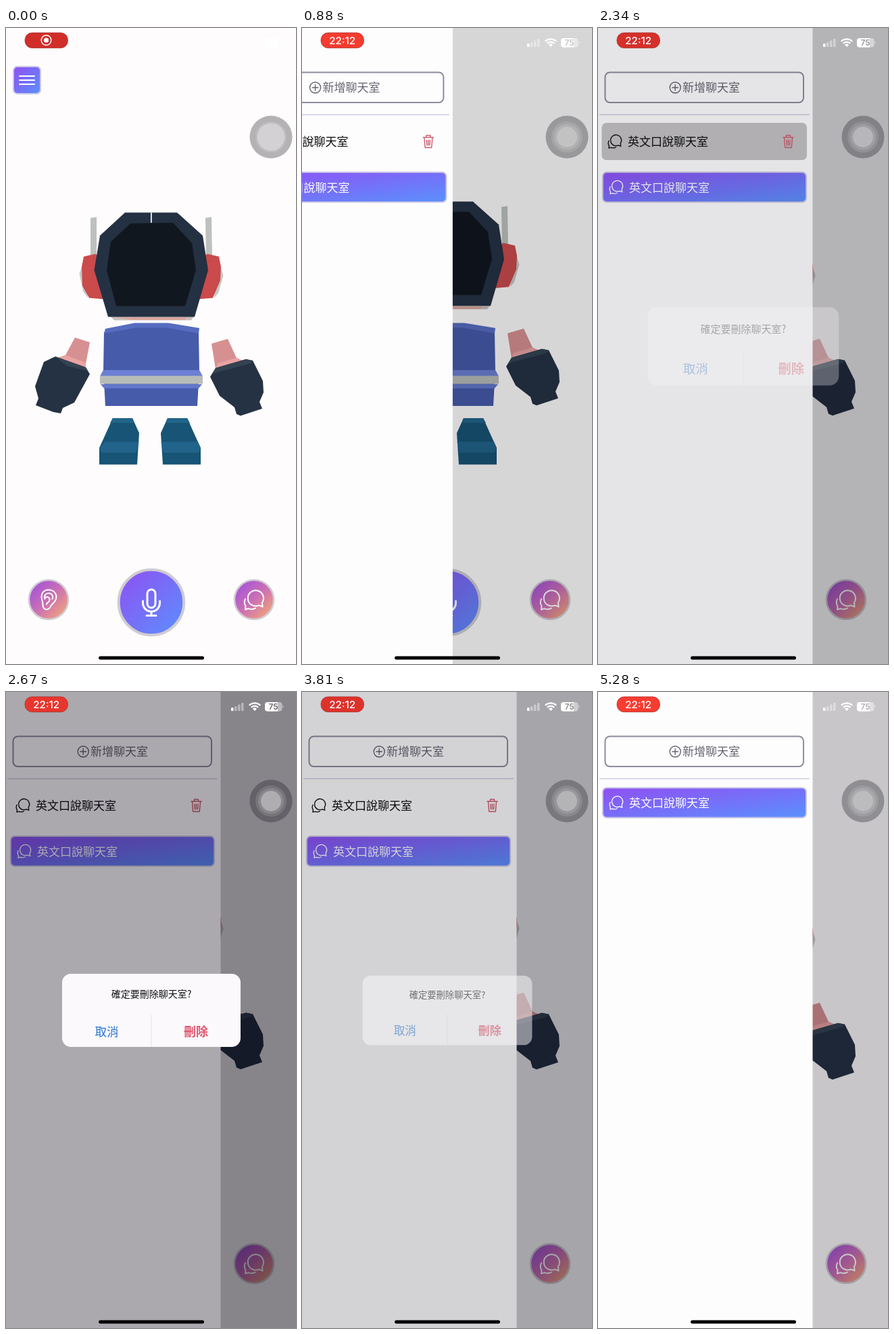
These frames come from a looping animation (429x939 px, 5340 ms). An HTML page:

```html
<!DOCTYPE html>
<html lang="zh-TW">
<head>
<meta charset="utf-8">
<title>Chat rooms</title>
<style>
html, body { margin: 0; width: 100%; height: 100%; overflow: hidden; background: #fefcfd; }
svg { display: block; width: 429px; height: 939px; }
text { font-family: "Noto Sans CJK TC", "Noto Sans CJK", sans-serif; font-size: 17px; }
.latin { font-family: Inter, Roboto, sans-serif; }
.mid { text-anchor: middle; }
.line { fill: none; stroke-linecap: round; stroke-linejoin: round; }
</style>
</head>
<body>
<svg viewBox="0 0 429 939" width="429" height="939">
  <defs>
    <linearGradient id="cool" x2="1" y2="1">
      <stop offset="0" stop-color="#9050f4"/>
      <stop offset=".5" stop-color="#766ff8"/>
      <stop offset="1" stop-color="#5a91fc"/>
    </linearGradient>
    <linearGradient id="warm" x2="1" y2="1">
      <stop offset=".1" stop-color="#a552da"/>
      <stop offset=".5" stop-color="#cb70b4"/>
      <stop offset=".92" stop-color="#f4a676"/>
    </linearGradient>
    <g id="bubbles" class="line">
      <path d="M10.300 12.500L5 10.400A11.600 11.600 0 1 1 9.600 6.500Z"/>
      <path d="M-15.200 1.100A10 10 0 0 0 -14.800 11.500L-15.300 16.700L-10.800 15.100A12 12 0 0 0 -.4 14.700"/>
    </g>
  </defs>
  <rect width="429" height="939" fill="#fefcfd"/>

  <g id="menu">
    <rect x="11" y="57" width="40" height="40" rx="6" fill="url(#cool)" stroke="#cbc6e6" stroke-width="2"/>
    <path class="line" d="M20 71H42M20 77H42M20 83H42" stroke="#fff" stroke-width="2"/>
  </g>

  <g id="body"></g>
  <g id="hands"></g>
  <g id="head"></g>

  <g stroke="#cfccd2">
    <circle cx="63" cy="844" r="29" fill="url(#warm)" stroke-width="2.6"/>
    <circle cx="215" cy="848" r="48.3" fill="url(#cool)" stroke-width="4"/>
    <circle cx="367" cy="844" r="29" fill="url(#warm)" stroke-width="2.6"/>
  </g>
  <g class="line" stroke="#fff" stroke-width="2">
    <path d="M54 847C50 836 55 829.500 63 829.500C71 829.500 76 836 74 843C72 849 68 850 66 854C64 859 58 860 55.500 856C54 853 54.500 850 54 847Z"/>
    <path d="M57.500 843C55.500 838 59 834.500 63 834.500C68 834.500 70.500 839 68.500 843M58 841C62 838.500 66 842 64 846C63 848.500 60 848 60 851"/>
    <g stroke-width="3">
      <rect x="209" y="829" width="12" height="27" rx="6"/>
      <path d="M202.500 846V849A12.500 12.500 0 0 0 227.500 849V846M215 862V867M208 867.500H222"/>
    </g>
    <use href="#bubbles" x="369.300" y="842"/>
  </g>

  <rect id="shade" width="429" height="939" fill="#05020c"/>

  <g id="panel">
    <rect width="317.500" height="939" fill="#fefdfe"/>
    <rect x="10.500" y="65.500" width="293.500" height="44.500" rx="7" fill="none" stroke="#8d8b9d" stroke-width="2"/>
    <path class="line" d="M110 88H118.500M114.200 83.700V92.200" stroke="#66636f" stroke-width="1.400"/>
    <circle cx="114.200" cy="88" r="8" fill="none" stroke="#66636f" stroke-width="1.400"/>
    <text x="125" y="94" fill="#66636f">新增聊天室</text>
    <path d="M2 128H313" stroke="#d2cde0" stroke-width="1.500"/>
    <g id="room">
      <rect id="press" x="5.500" y="140" width="303.500" height="55" rx="7" fill="#c4c2c4"/>
      <use href="#bubbles" transform="translate(26.600 165.900)scale(.69)" stroke="#111" stroke-width="2"/>
      <text x="44" y="174" fill="#0b0b0d">英文口說聊天室</text>
      <path class="line" d="M274 161.500H289M278.500 161V158.500H284.500V161M275.500 162L276.700 176.500H286.300L287.500 162M279 165.500L279.400 173M281.500 165.500V173M284 165.500L283.600 173" stroke="#cc5c6c" stroke-width="1.400"/>
    </g>
    <g id="active">
      <rect x="7" y="213" width="301" height="44" rx="6" fill="url(#cool)" stroke="#c8c4e6" stroke-width="2"/>
      <use href="#bubbles" transform="translate(28.600 233.400)scale(.69)" stroke="#fff" stroke-width="1.900"/>
      <text x="46" y="241.500" fill="#fff">英文口說聊天室</text>
    </g>
  </g>

  <rect id="dim" width="429" height="939" fill="#05020c"/>
  <g id="alert">
    <rect x="83" y="416" width="264" height="108" rx="13" fill="#fbf9fc"/>
    <path d="M215 477V524" stroke="#e3e1e6"/>
    <text class="mid" x="215" y="451" style="font-size:14px" fill="#111">確定要刪除聊天室?</text>
    <text class="mid" x="149" y="507.500" style="font-size:17.500px" fill="#2874d2">取消</text>
    <text class="mid" x="281" y="507.500" style="font-size:18px;font-weight:700" fill="#e0586e">刪除</text>
  </g>

  <g fill="#fff">
    <rect x="333" y="23" width="3.500" height="5" rx="1"/>
    <g opacity=".4">
      <rect x="338" y="21" width="3.500" height="7" rx="1"/>
      <rect x="343" y="18.500" width="3.500" height="9.500" rx="1"/>
      <rect x="348" y="16" width="3.500" height="12" rx="1"/>
    </g>
    <path d="M368 28L365 24.800A4.300 4.300 0 0 1 371 24.800Z"/>
    <g class="line" stroke="#fff" stroke-width="2.200" style="stroke-linecap:butt">
      <path d="M362.800 22.700A7.400 7.400 0 0 1 373.200 22.700M359.800 19.800A11.600 11.600 0 0 1 376.200 19.800"/>
    </g>
    <rect x="383" y="15" width="25.500" height="13.500" rx="4" opacity=".45"/>
    <path d="M387 15H402V28.500H387A4 4 0 0 1 383 24.500V19A4 4 0 0 1 387 15Z"/>
    <path d="M409.500 19.500Q412 21.700 409.500 24Z" opacity=".5"/>
  </g>
  <text id="charge" class="latin mid" x="395.500" y="26" style="font-size:12px;font-weight:600">75</text>

  <rect id="pill" x="28" y="7" width="63.500" height="22.500" rx="10.500" stroke="#a52a26" stroke-width=".7"/>
  <g id="rec">
    <circle cx="59.500" cy="18" r="7.300" fill="none" stroke="#fff" stroke-width="1.500"/>
    <circle cx="59.500" cy="18" r="3.600" fill="#fff"/>
  </g>
  <text id="clock" class="latin mid" x="59.700" y="23.700" style="font-size:15.200px;font-weight:500" fill="#fff">22:12</text>

  <circle cx="392" cy="161" r="31.500" fill="#1e1c23" opacity=".33"/>
  <g fill="#fff">
    <circle cx="392" cy="161" r="23" opacity=".12"/>
    <circle id="ring" cx="392" cy="161" opacity=".13"/>
    <circle id="knob" cx="392" cy="161"/>
  </g>
  <rect x="137" y="927.500" width="156" height="5" rx="2.500" fill="#000"/>
</svg>

<script>
const LOOP = 5340, STEP = 66.75, BOB = 588;
const $ = id => document.getElementById(id);
const set = (id, name, value) => $(id).setAttribute(name, value);
const show = (id, on) => set(id, "visibility", on ? "visible" : "hidden");
const ramp = (t, start, len) => Math.min(1, Math.max(0, (t - start) / len));
const smooth = u => u * u * (3 - 2 * u);
const wave = (t, period) => (1 - Math.cos(2 * Math.PI * t / period)) / 2;
const build = (id, parts) => {
  $(id).innerHTML = parts.map(([fill, d]) => `<path fill="${fill}" d="M${d}Z"/>`).join("");
};

build("body", [
  ["#465ba9", "145 449L190 438H240L285 449L286 506L283 558H147L144 506"],
  ["#566cc0", "147 444L190 435.500H240L286 443L285 451L238 442.500H192L145 451"],
  ["#6b7fd4", "144 505H286L291 514H139"],
  ["#6277ca", "140 526H290L285 532H145"],
  ["#b8bcb9", "139 513.500H291V525.500H139"],
  ["#175475", "158 576H187L197 598L194 644.500H138V620"],
  ["#22648a", "158 576H187L190 583H154"],
  ["#21638a", "147 611H196.500L193 627H141L138 620"],
  ["#175475", "268 576H239L229 598L232 644.500H288V620"],
  ["#22648a", "268 576H239L236 583H272"],
  ["#21638a", "284 611H229.500L233 627H285L288 620"]
]);
build("hands", [
  ["#d79091", "102 456L124 463L117 500L76 486L88 482"],
  ["#eaa3a2", "88 482L118 493L117 502L74 487"],
  ["#253243", "73 484L118 500L124 510L101 552L84 560L81 568L70 566L44 556L48 546L43 528L56 492"],
  ["#344352", "73 484L118 500L121 505L90 498"],
  ["#d79091", "304 465L328 458L341 486L352 491L310 502"],
  ["#eaa3a2", "313 494L341 486L352 491L309 503"],
  ["#253243", "310 501L355 488L365 490L380 520L381 537L375 551L379 561L347 571.500L341 569L338 559L316 542L302 514"],
  ["#344352", "310 501L355 488L365 490L362 494L306 509"]
]);
build("head", [
  ["#bcc1bd", "125 280L134 278.500V340H125"],
  ["#bcc1bd", "295 280L304 278.500L305 340H296"],
  ["#c5c8c6", "117 338L108.500 362L114 388L121 398"],
  ["#c5c8c6", "313 338L321.500 365L314 391L308 398"],
  ["#cb4a4b", "115 337L132 333L142 340L147 400L123 398L113 380L112 352"],
  ["#cb4a4b", "315 337L298 333L288 340L283 400L306 398L317 372L318 352"],
  ["#c7beba", "153 424H279L274 431H160"],
  ["#dca49b", "163 427H268L264 430.500H186"],
  ["#243143", "176 272H253L291 306L299 357L279 426H151L130.500 357L139 306"],
  ["#11171f", "184 288L247 287L275 317L281 357L265 410H163L149 357L155 315"],
  ["#fefcfd", "214 272H215.700V287H214"]
]);

function draw(ms) {
  const t = Math.floor(ms % LOOP / STEP) * STEP + 10;

  const lift = wave(t - 20, BOB);
  set("head", "transform", `translate(0 ${0.5 - 16.5 * lift})`);
  set("hands", "transform", `translate(0 ${1 - 15.5 * lift})`);

  // Side panel slides in while the page behind darkens.
  const slide = 1 - (1 - ramp(t, 788, 270)) ** 3;
  set("panel", "transform", `translate(${-318 * (1 - slide)} 0)`);
  set("shade", "opacity", 0.215 * slide);
  set("menu", "opacity", 1 - 0.25 * ramp(t, 540, 100));

  const press = ramp(t, 2130, 80) * (1 - ramp(t, 2420, 200));
  set("press", "opacity", press);

  // The alert shrinks into place, and keeps shrinking as it leaves.
  const enter = smooth(ramp(t, 2285, 170));
  const leave = smooth(ramp(t, 3750, 130));
  const seen = enter * (1 - leave);
  const scale = 1.1 - 0.1 * enter - 0.1 * leave;
  set("dim", "opacity", 0.335 * seen);
  set("alert", "opacity", seen);
  set("alert", "transform", `translate(215 470)scale(${scale})translate(-215 -470)`);

  const removed = t >= 3950;
  show("room", !removed);
  set("active", "transform", `translate(0 ${removed ? -71.5 : 0})`);

  const timed = t > 400;
  show("rec", !timed);
  show("clock", timed);
  const glow = wave(t, 2100);
  set("pill", "fill", `rgb(${209 + 40 * glow},${46 + 14 * glow},${42 + 6 * glow})`);
  const tone = 254 * (1 - 0.21 * slide) * (1 - 0.33 * seen) - 26 * slide;
  set("charge", "fill", `rgb(${tone},${tone},${tone})`);

  const rest = ramp(t, 350, 150);
  set("ring", "r", 21 - 2 * rest);
  set("knob", "r", 20 - 5 * rest);
  set("knob", "opacity", 0.22 + 0.1 * seen);
}

function tick() {
  draw(performance.now());
  requestAnimationFrame(tick);
}
tick();
</script>
</body>
</html>
```
